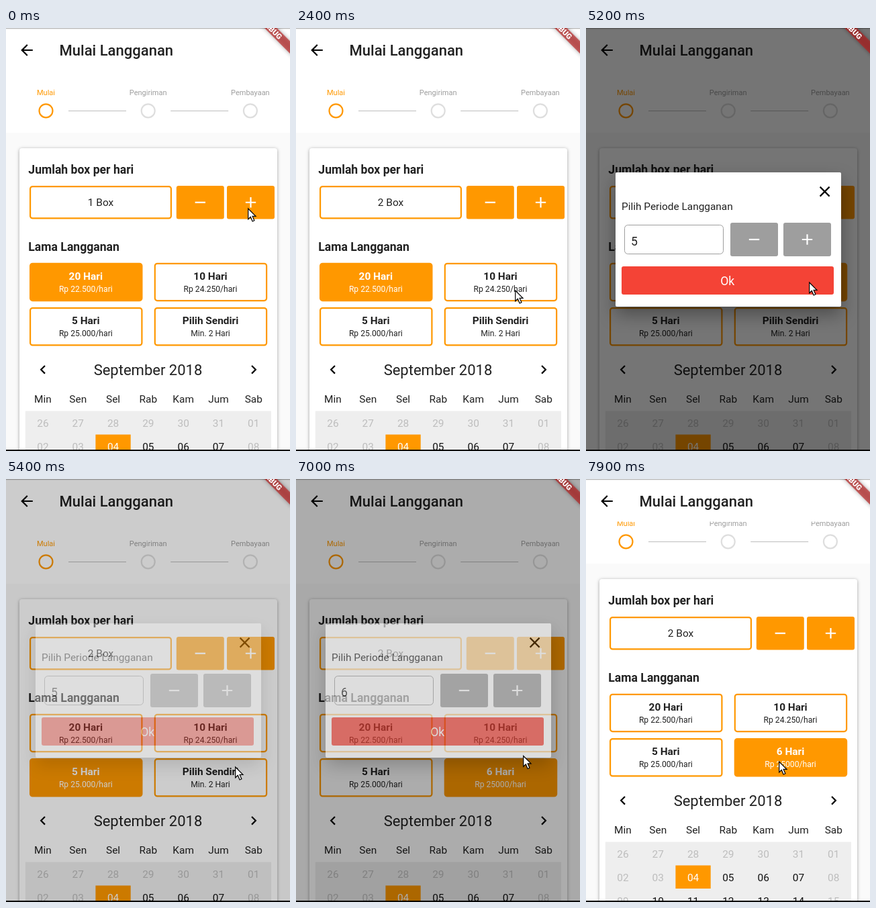
Recreate the animation shown at these times as an HTML page. Size 423 by 630 pixels, loop 8 s.

```html
<!DOCTYPE html>
<html lang="id">
<head>
<meta charset="utf-8">
<title>Mulai Langganan</title>
<style>
html, body { margin: 0; height: 100%; overflow: hidden; background: #fafafa; }
svg { display: block; width: 100vw; height: 100vh; font-family: Roboto, sans-serif; }
.card { filter: drop-shadow(0 1.5px 2.5px rgba(0,0,0,.36)); }
.dialog { filter: drop-shadow(0 12px 13px rgba(0,0,0,.34)); }
.ribbon { filter: drop-shadow(0 0 3px rgba(0,0,0,.45)); }
</style>
</head>
<body>
<svg id="stage" viewBox="0 0 423 630"></svg>
<script>
const LOOP = 8000, TICK = 100, DP = 1.1016;
const ORANGE = '#ff9800', INK = '#212121', GREY = '#9e9e9e';
const stage = document.getElementById('stage');

// Tracks: [time, ...values], linear between entries.
const CURSOR = [
  [0, 360, 268], [100, 360, 268], [200, 360, 266], [1000, 360, 266], [1400, 289, 264],
  [1500, 289, 264], [2200, 322, 377], [2300, 322, 377], [2400, 326, 390], [3200, 326, 390],
  [3300, 314, 438], [3400, 316, 430], [3600, 336, 320], [4700, 336, 320], [5000, 332, 378],
  [5200, 332, 378], [5400, 341, 428], [5500, 342, 438], [6100, 342, 438], [6200, 334, 320],
  [6400, 334, 320], [6700, 333, 378], [6900, 333, 380], [7100, 343, 443], [7500, 288, 462],
  [7600, 287, 452], [7900, 287, 420]
];
const FADE = [
  [0, 0], [3300, 0], [3400, .3], [3500, .75], [3600, 1], [5200, 1], [5300, .75], [5400, .37], [5500, 0],
  [6100, 0], [6200, 1], [6900, 1], [7000, .6], [7100, .15], [7200, 0]
];
const SCROLL = [[0, 0], [7600, 0], [7700, 7], [7900, 30]];

// Hard changes: [time, value].
const BOXES = [[0, 1], [600, 2], [1100, 3], [1600, 2]];
const DAYS = [[0, 2], [3900, 3], [4300, 4], [4700, 5], [6400, 6]];
const CHOICE = [[0, 0], [3300, 1], [5300, 2], [7000, 3]];

const held = (track, t) => track.filter(k => k[0] <= t).pop()[1];

function tween(track, t) {
  const i = track.findIndex(k => k[0] > t);
  if (i < 0) return track[track.length - 1].slice(1);
  const a = track[i - 1], b = track[i], p = (t - a[0]) / (b[0] - a[0]);
  return a.slice(1).map((v, j) => v + (b[j + 1] - v) * p);
}

const text = (s, x, y, size, fill = INK, weight = 400, anchor = 'middle') =>
  `<text x="${x}" y="${y}" font-size="${size * DP}" fill="${fill}" font-weight="${weight}" text-anchor="${anchor}">${s}</text>`;
const rect = (x, y, w, h, fill, r = 0, extra = '') =>
  `<rect x="${x}" y="${y}" width="${w}" height="${h}" rx="${r}" fill="${fill}" ${extra}/>`;
const line = (d, color, width) => `<path d="${d}" stroke="${color}" stroke-width="${width}" fill="none"/>`;
const icon = (d, x, y) =>
  `<path d="${d}" transform="translate(${x} ${y}) scale(${DP}) translate(-12 -12)"/>`;
const outlined = (x, y, w, h, fill = '#fff') =>
  rect(x + 1.1, y + 1.1, w - 2.2, h - 2.2, fill, 3.5, `stroke="${ORANGE}" stroke-width="2.2"`);

function button(x, y, h, fill, plus) {
  const cx = x + 35.5, cy = y + h / 2;
  return rect(x, y, 71, h, fill, 3) +
    line(`M${cx - 7.7} ${cy}h15.4` + (plus ? `M${cx} ${cy - 7.7}v15.4` : ''), '#fff', 2.2);
}

function steps() {
  return rect(0, 0, 423, 156, '#fff') +
    ['Mulai', 'Pengiriman', 'Pembayaan'].map((name, i) => {
      const x = 59.5 + 152.2 * i;
      return text(name, x, 100, 10, i ? GREY : ORANGE) +
        `<circle cx="${x}" cy="123.3" r="10" fill="#fff" stroke="${i ? '#dedede' : ORANGE}" stroke-width="2.2"/>` +
        (i < 2 ? line(`M${x + 33.5} 123.5h86`, '#bdbdbd', 1.1) : '');
    }).join('');
}

function options(days, choice) {
  const custom = days === 2 || days === 5
    ? ['Pilih Sendiri', 'Min. 2 Hari'] : [days + ' Hari', 'Rp 25000/hari'];
  return [['20 Hari', 'Rp 22.500/hari'], ['10 Hari', 'Rp 24.250/hari'], ['5 Hari', 'Rp 25.000/hari'], custom]
    .map(([name, note], i) => {
      const x = 35 + i % 2 * 185.7, y = 349.7 + (i >> 1) * 66.3, on = i === choice;
      const ink = on ? '#fff' : INK;
      return outlined(x, y, 168.5, 57.5, on ? ORANGE : '#fff') +
        text(name, x + 83.8, y + 25.3, 14, ink, 700) + text(note, x + 83.8, y + 43.3, 11, ink);
    }).join('');
}

function calendar() {
  const col = 52.3, row = 35, left = 28.8, top = 570.5;
  let out = icon('M15.41 7.41L14 6l-6 6 6 6 1.41-1.41L10.83 12z', 55, 508.8) +
    icon('M8.59 16.59L10 18l6-6-6-6-1.41 1.41L13.17 12z', 369, 508.8) +
    text('September 2018', 211.5, 517, 20) + rect(left, top, 7 * col, 4 * row, '#eee');
  ['Min', 'Sen', 'Sel', 'Rab', 'Kam', 'Jum', 'Sab'].forEach((name, i) => {
    const x = left + col * (i + .5);
    out += text(name, x, 558, 14);
    for (let r = 0; r < 3; r++) {
      const n = r * 7 + i - 5, today = n === 4;
      const off = n < 4 || i % 6 === 0;
      if (today) out += rect(left + col * i, top + row * r, col, row - .5, ORANGE);
      out += text(String(n > 0 ? n : n + 31).padStart(2, '0'), x, top + row * r + 23, 14,
        today ? '#fff' : off ? '#bdbdbd' : '#111');
    }
  });
  return out;
}

function page(t) {
  return steps() + rect(20, 179, 384, 600, '#fff', 4, 'class="card"') +
    text('Jumlah box per hari', 33.3, 217, 16, INK, 700, 'start') +
    outlined(35, 235, 212, 49.5) + text(held(BOXES, t) + ' Box', 141, 265, 14) +
    button(253.8, 235, 49.5, ORANGE) + button(329, 235, 49.5, ORANGE, true) +
    text('Lama Langganan', 33.3, 332, 16, INK, 700, 'start') +
    options(held(DAYS, t), held(CHOICE, t)) + calendar();
}

function appBar() {
  return rect(0, 0, 423, 63.5, '#fff') + rect(0, 0, 423, 1.3, '#b8b8b8') +
    icon('M20 11H7.83l5.59-5.59L12 4l-8 8 8 8 1.41-1.41L7.83 13H20v-2z', 31, 33) +
    text('Mulai Langganan', 79.5, 41, 20, INK, 500, 'start');
}

function dialog(t, alpha) {
  if (!alpha) return '';
  return rect(0, 0, 423, 628, '#000', 0, `opacity="${.54 * alpha}"`) + `<g opacity="${alpha}">` +
    rect(44, 215, 336, 200, '#fff', 2, 'class="dialog"') +
    line('M348.6 236.6l14 14m0-14l-14 14', '#000', 2.2) +
    text('Pilih Periode Langganan', 53, 271, 14, INK, 400, 'start') +
    rect(57.5, 293.5, 147, 43, '#fff', 5, `stroke="${GREY}"`) +
    text(held(DAYS, t), 67, 324, 16, INK, 400, 'start') +
    button(215, 290, 50, GREY) + button(294, 290, 50, GREY, true) +
    rect(53, 355, 316, 42, '#f44336', 3) + text('Ok', 210.7, 383, 16, '#fff') + '</g>';
}

const ribbon = '<g transform="translate(423 -24.2) rotate(45)">' +
  rect(-50, 28 * DP, 100, 12 * DP, '#b71c1c', 0, 'fill-opacity=".67" class="ribbon"') +
  text('DEBUG', 0, 41.4, 10.2, '#fff', 900) + '</g>';

const pointer = ([x, y]) => `<path transform="translate(${x} ${y})" fill="#fff" stroke="#000" stroke-width="1.2"
  d="M.7 1V16.8L4.3 13.4 7.1 20 9.9 18.8 7.1 12.3H12Z"/>`;

function draw(t) {
  stage.innerHTML = rect(0, 0, 423, 630, '#fafafa') +
    `<g transform="translate(0 ${-tween(SCROLL, t)[0]})">${page(t)}</g>` +
    appBar() + dialog(t, tween(FADE, t)[0]) + ribbon +
    rect(0, 628, 423, 2, '#000') + pointer(tween(CURSOR, t));
}

let shown = -1;
function frame() {
  const t = Math.floor(performance.now() % LOOP / TICK) * TICK;
  if (t !== shown) draw(shown = t);
  requestAnimationFrame(frame);
}
frame();
</script>
</body>
</html>
```
